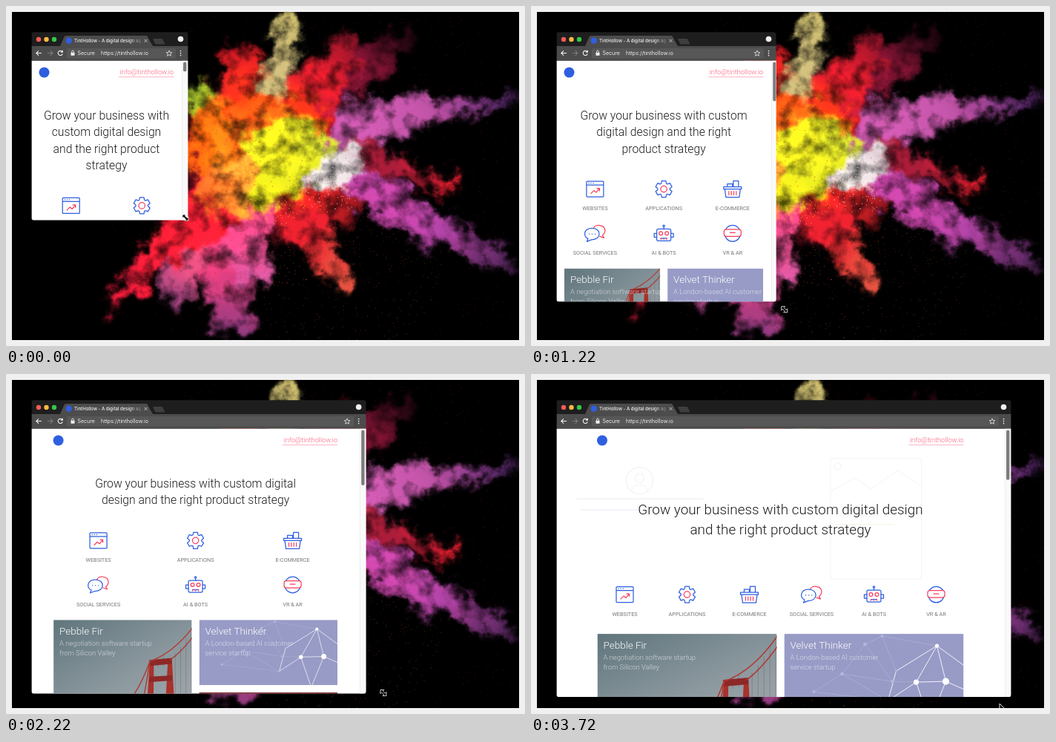
An HTML page that plays this animation: 700x458 px, repeating every 3.82 s.

```html
<!DOCTYPE html>
<html lang="en">
<head>
<meta charset="utf-8">
<title>Responsive page</title>
<style>
html, body { margin: 0; width: 100%; height: 100%; overflow: hidden; background: #f0f0f0; }
svg { position: absolute; left: 0; top: 0; width: 100%; height: 100%; display: block; }
#back { will-change: transform; }
text { font-family: Roboto, sans-serif; white-space: pre; }
.light { font-weight: 300; }
.ui { font-family: Inter, sans-serif; }
</style>
</head>
<body>
<svg id="back" viewBox="0 0 700 458">
  <defs>
    <filter id="smoke" filterUnits="userSpaceOnUse" x="0" y="0" width="700" height="458" color-interpolation-filters="sRGB">
      <feTurbulence type="fractalNoise" baseFrequency=".04" numOctaves="5" seed="7" result="n"/>
      <feColorMatrix in="n" values="0 0 2.4 0 -.4  0 0 2.4 0 -.4  0 0 2.4 0 -.4  0 0 0 0 1" result="tone"/>
      <feGaussianBlur in="SourceGraphic" stdDeviation="4" result="soft"/>
      <feDisplacementMap in="soft" in2="n" scale="44" xChannelSelector="R" yChannelSelector="G" result="torn"/>
      <feComposite in="torn" in2="tone" operator="arithmetic" k1=".85" k2=".36"/>
    </filter>
    <radialGradient id="glow">
      <stop stop-color="#e42020"/><stop offset=".6" stop-color="#c01a2c"/><stop offset="1" stop-color="#7a1028" stop-opacity="0"/>
    </radialGradient>
    <clipPath id="desk"><rect x="8" y="8" width="684" height="442"/></clipPath>
  </defs>
  <rect x="8" y="8" width="684" height="442"/>
  <g id="cloud" clip-path="url(#desk)"></g>
</svg>
<svg id="front" viewBox="0 0 700 458">
  <defs>
    <linearGradient id="fade" gradientUnits="userSpaceOnUse" x1="166" y1="0" x2="186" y2="0">
      <stop stop-color="#f2f2f2"/><stop offset="1" stop-color="#f2f2f2" stop-opacity="0"/>
    </linearGradient>
    <linearGradient id="fog" x1="0" y1="0" x2=".5" y2="1">
      <stop stop-color="#60757d"/><stop offset=".5" stop-color="#8c999f"/><stop offset="1" stop-color="#a9b1b6"/>
    </linearGradient>
    <clipPath id="edge"><rect x="8" y="8" width="684" height="442"/></clipPath>
    <g id="icons"></g>
  </defs>
  <g id="scene"></g>
</svg>
<script>
const LOOP = 3820, BLUE = '#2f5fe0', RED = '#f8405f';
const el = id => document.getElementById(id);

let seed = 11;
const rnd = () => (seed = seed * 16807 % 2147483647) / 2147483647;

// ---------- Markup helpers ----------
const rect = (x, y, w, h, fill, more = '') =>
  `<rect x="${x}" y="${y}" width="${w}" height="${h}" fill="${fill}" ${more}/>`;
const dot = (x, y, r, fill, more = '') => `<circle cx="${x}" cy="${y}" r="${r}" fill="${fill}" ${more}/>`;
const line = (d, color, w = 1, more = '') =>
  `<path d="${d}" fill="none" stroke="${color}" stroke-width="${w}" ${more}/>`;
const text = (s, x, y, size, fill, more = '') =>
  `<text x="${x}" y="${y}" font-size="${size}" fill="${fill}" ${more}>${s}</text>`;
const move = (x, y, inner, s = 1) => `<g transform="translate(${x} ${y}) scale(${s})">${inner}</g>`;

// ---------- Powder burst ----------
// Base x y, tip x y, half width at base and tip, two colours.
const outerPlumes = [
  [430, 115, 550, 36, 32, 16, '#7a1230', '#18040c'],
  [390, 155, 470, 42, 40, 20, '#e01c28', '#7a1024'],
  [440, 168, 695, 122, 28, 5, '#b04890', '#44205c'],
  [450, 168, 575, 132, 30, 24, '#b04c96', '#9c4488'],
  [470, 200, 606, 244, 18, 8, '#8f1830', '#d81c2c'],
  [450, 225, 684, 350, 20, 14, '#a83a90', '#46204e'],
  [480, 240, 600, 312, 24, 24, '#b03c94', '#90388a'],
  [375, 260, 464, 378, 34, 14, '#c81c28', '#c04a38'],
  [400, 245, 475, 280, 30, 16, '#d02020', '#701018'],
  [270, 275, 222, 402, 34, 22, '#e04a70', '#84386c'],
  [300, 250, 306, 444, 42, 28, '#e0386c', '#74306a'],
  [315, 265, 338, 375, 36, 26, '#dc4078', '#b84c8c'],
  [300, 235, 132, 418, 46, 2, '#e81c30', '#d81838'],
  [400, 140, 440, 140, 44, 30, '#d81c24', '#a8182c']
];
const innerPlumes = [
  [335, 160, 304, 54, 44, 24, '#ea3418', '#b01020'],
  [390, 160, 385, 92, 40, 24, '#e83810', '#c01828'],
  [360, 120, 385, 8, 19, 13, '#b0a068', '#a89c58'],
  [290, 160, 248, 112, 26, 18, '#c0a818', '#78a028'],
  [355, 195, 248, 185, 72, 56, '#ff9a18', '#f4580c'],
  [355, 195, 322, 122, 48, 36, '#ff7a18', '#f04010'],
  [340, 230, 262, 262, 42, 26, '#ffa030', '#f05020'],
  [420, 222, 482, 205, 32, 20, '#d4cccc', '#b4a6ac'],
  [380, 195, 346, 276, 44, 18, '#c2c41c', '#dcd418'],
  [360, 188, 440, 186, 36, 16, '#d4d01c', '#b8c22c']
];

function plume([x0, y0, x1, y1, w0, w1, c0, c1], i) {
  const len = Math.hypot(x1 - x0, y1 - y0), turn = Math.atan2(y1 - y0, x1 - x0) * 180 / Math.PI;
  const m = (w0 + w1) / 2;
  const d = `M${-w0} 0C${-w0} ${-w0 * 1.2} ${w0 * .6} ${-w0 * 1.2} ${len * .5} ${-m}` +
    `S${len} ${-w1 * 1.4} ${len} 0S${len * .7} ${m} ${len * .5} ${m}` +
    `S${-w0} ${w0 * 1.2} ${-w0} 0Z`;
  return `<linearGradient id="p${i}"><stop stop-color="${c0}"/><stop offset=".5" stop-color="${c0}"/>` +
    `<stop offset="1" stop-color="${c1}"/></linearGradient>` +
    `<path transform="translate(${x0} ${y0}) rotate(${turn})" fill="url(#p${i})" d="${d}"/>`;
}

function specks(n, color, place) {
  let d = '';
  for (let i = 0; i < n; i++) {
    const [x, y] = place();
    d += `M${x.toFixed(1)} ${y.toFixed(1)}h.9`;
  }
  return line(d, color, .9);
}
const ring = (cx, cy, r) => () => {
  const a = rnd() * 6.283, k = r * Math.sqrt(rnd());
  return [cx + k * Math.cos(a), cy + k * Math.sin(a)];
};

el('cloud').innerHTML =
  specks(1500, '#4a0c1a', ring(440, 250, 300)) + specks(500, '#5a3414', ring(440, 330, 150)) +
  '<g filter="url(#smoke)"><ellipse cx="360" cy="200" rx="150" ry="125" fill="url(#glow)"/>' +
  [...outerPlumes, ...innerPlumes].map(plume).join('') + '</g>' +
  specks(400, '#c03a30', ring(350, 230, 150)) + specks(90, '#e8dcd8', ring(440, 248, 36)) +
  specks(110, '#e4d820', ring(360, 255, 45));

// ---------- Service icons, centred on 0 0 ----------
function gearPath() {
  let d = '';
  for (let i = 0; i < 6; i++) {
    [[-.42, 8.3], [-.25, 11.4], [.25, 11.4], [.42, 8.3]].forEach(([o, r]) => {
      const a = i * Math.PI / 3 + Math.PI / 6 + o;
      d += (d ? 'L' : 'M') + (r * Math.cos(a)).toFixed(2) + ' ' + (r * Math.sin(a)).toFixed(2);
    });
  }
  return d + 'Z';
}
const ink = (d, color = BLUE) => line(d, color, 1.25, 'stroke-linejoin="round" stroke-linecap="round"');
const hoop = (x, y, r, color) => dot(x, y, r, 'none', `stroke="${color}" stroke-width="1.25"`);
const box = (x, y, w, h, r, color, fill = 'none') =>
  rect(x, y, w, h, fill, `rx="${r}" stroke="${color}" stroke-width="1.25"`);
const icons = [
  box(-11.5, -10.5, 23, 21, 1, BLUE) + ink('M-11-5.5H11M-8.5-8h.3M-5.5-8h.3M-2.5-8h.3') +
    ink('M-5.5 6L-1.5 2L1.5 4.5L6-1M2.5-1H6V2.5', RED),
  ink(gearPath()) + hoop(0, 0, 4.2, RED),
  ink('M-12-3H12V0H-12ZM-10.5 0L-9 11H9L10.5 0M-7-3V-7H0V-3M1-3V-11H8V-3') + ink('M-5 3V8M-1.7 3V8M1.7 3V8M5 3V8', RED),
  ink('M-2-7C0-13 13-12 13.5-4C13.5-1 12 1 10 2.5L12 6L6.5 4', RED) +
    ink('M-4-7C-16-7-16 5-9.5 7L-11 11L-5 8.5C9 9 9-7-4-7Z') + ink('M-8 .8h.3M-4 .8h.3M0 .8h.3'),
  box(-9.5, -6, 19, 16, 2, BLUE) + ink('M0-6V-9M-9.5 0H-13V5H-9.5M9.5 0H13V5H9.5M-4 6.5H4') + hoop(0, -10, 1.2, BLUE) +
    hoop(-4, 0, 2.4, RED) + hoop(4, 0, 2.4, RED) + ink('M-4 6.5V8M0 6.5V8M4 6.5V8', RED),
  hoop(0, 0, 10.8, BLUE) + box(-11.5, -5.5, 23, 9.5, 3, RED, '#fff') + ink('M-3.5-1H3.5', RED)
];
el('icons').innerHTML = icons.map((s, i) => `<g id="i${i}">${s}</g>`).join('');
const labels = ['WEBSITES', 'APPLICATIONS', 'E-COMMERCE', 'SOCIAL SERVICES', 'AI &amp; BOTS', 'VR &amp; AR'];

// ---------- Motion ----------
// Time, window right and bottom, page right, cursor x and y.
const keys = [
  [0, 245, 288.5, 245, 242, 285],
  [180, 245, 288.5, 245, 243, 287],
  [820, 288, 356, 292, 300, 375],
  [1520, 369, 420, 369, 380, 423],
  [1920, 435, 430, 435, 458, 428],
  [2620, 551, 431, 551, 572, 431],
  [3020, 612, 434.5, 612, 630, 433],
  [3380, 647, 435, 647, 644, 434],
  [3480, 647, 435, 647, 644, 434],
  [3720, 647, 435, 647, 632, 444],
  [3820, 647, 435, 647, 632, 444]
];

function slope(i, c) {
  const a = keys[i - 1], b = keys[i], d = keys[i + 1];
  if (!a || !d) return 0;
  const l = (b[c] - a[c]) / (b[0] - a[0]), r = (d[c] - b[c]) / (d[0] - b[0]);
  return l * r <= 0 ? 0 : 2 * l * r / (l + r);
}

function at(t, c) {
  let i = 0;
  while (i < keys.length - 2 && t >= keys[i + 1][0]) i++;
  const a = keys[i], b = keys[i + 1], h = b[0] - a[0], u = (t - a[0]) / h, v = 1 - u;
  return a[c] * v * v * (1 + 2 * u) + b[c] * u * u * (3 - 2 * u) +
    h * u * v * (slope(i, c) * v - slope(i + 1, c) * u);
}

// ---------- Browser window ----------
const LEFT = 34.4;

function chrome(R) {
  const grey = '#4c4c4c', pale = '#f0f0f0';
  return rect(LEFT, 35, R - LEFT + 1, 19.5, '#1e1e1e') +
    ['#fc5b57', '#fdbc40', '#34c84a'].map((c, i) => dot(44 + i * 10.5, 45, 3.2, c)).join('') +
    `<path d="M73 54L78.5 41.5Q79 40 81 40H189Q190.5 40 191 41.5L198 54Z" fill="${grey}"/>` +
    '<path d="M198 44H210Q211 44 211.5 45L214.5 51.5H203Q201 51.5 200.5 50Z" fill="#3e3e3e"/>' +
    dot(84.8, 46.7, 4.1, BLUE) +
    text('TintHollow - A digital design ag', 92, 49.2, 6.05, 'url(#fade)', 'class="ui" font-weight="500"') +
    line('M186.5 44.8l4 4m0-4l-4 4', '#c8c8c8', .9) +
    dot(R - 9.5, 44.5, 3.8, pale) +
    rect(LEFT, 54, R - LEFT + 1, 19.5, grey) + rect(82, 57, R - 98, 13.5, '#575757', 'rx="2"') +
    line('M48 63.5H41M44 60.3L40.8 63.5L44 66.7', pale, 1.1) +
    line('M56 63.5H62.5M59.7 60.3L62.9 63.5L59.7 66.7', '#7c7c7c', 1.1) +
    line('M75.8 61.5A3.1 3.1 0 1 0 76.3 64.5M76.3 59.8V62.3H73.8', pale, 1.1) +
    rect(87.5, 62.7, 5, 4, pale, 'rx=".5"') + line('M88.6 63V61.5A1.4 1.4 0 0 1 91.4 61.5V63', pale, .9) +
    text('Secure', 96.5, 66.3, 7, pale, 'class="ui"') +
    text('https://tinthollow.io', 128, 66.3, 7.1, pale, 'class="ui"') +
    move(R - 25, 63.7, line('M0-3.8L1.1-1.2L3.8-1L1.7.8L2.4 3.5L0 2L-2.4 3.5L-1.7.8L-3.8-1L-1.1-1.2Z', pale, .8)) +
    [-3, 0, 3].map(d => dot(R - 9.5, 63.6 + d, .85, pale)).join('');
}

// ---------- Page ----------
const headings = [
  ['Grow your business with', 'custom digital design', 'and the right product', 'strategy'],
  ['Grow your business with custom', 'digital design and the right', 'product strategy'],
  ['Grow your business with custom digital', 'design and the right product strategy'],
  ['Grow your business with custom digital design', 'and the right product strategy']
];

// Picks sizes for the width available.
function layout(pageRight) {
  const w = pageRight - 44, center = 35 + w / 2;
  if (w >= 514) return { center, cw: 494, cols: 6, size: 18.9, lead: 26.8, top: 188.8, iconGap: 81.5, labelGap: 29,
    cardGap: 24, lines: headings[3], doc: 1945, wide: true };
  const tablet = w >= 403, cw = tablet ? 383 : w - 20;
  const pick = tablet ? 2 : cw < 225 ? 0 : cw < 271 ? 1 : cw < 330 ? 2 : 3;
  return { center, cw, cols: cw < 265 ? 2 : 3, size: 15.75, lead: 22.3, top: 153, iconGap: 49, labelGap: 28.7,
    cardGap: 18.5, lines: headings[pick], doc: tablet ? 1709 : cw < 265 ? 3600 : 2000, phone: !tablet };
}

function cardText(title, lines, x, y) {
  return text(title, x + 8, y + 19.8, 13.5, '#fff', 'class="light"') +
    lines.map((s, i) => text(s, x + 8, y + 34.5 + i * 13, 9.4, '#fff', 'class="light" fill-opacity=".66"')).join('');
}

function bridge(w, L) {
  const s = L.phone ? w / 181 : L.wide ? 1 : .9;
  const top = L.phone ? 28 : L.wide ? 62 : 54;
  const tower =
    '<path d="M-18 90L-12 0H-6L-7 90ZM10 90L15-1H21L26 90Z" fill="#a8322c"/>' +
    '<path d="M-13 0L21-3V6L-13 9ZM-12 25L21 23V31L-13 33ZM-14 52L23 50V57L-14 59Z" fill="#8e2826"/>' +
    line('M-12 2Q28-12 62-62M18 0Q40-14 72-62M-12 2Q-22 30-36 52M-12 2Q-18 40-24 70', '#b03a34', 1.6) +
    line('M0-4V12M8-8V10M26-10V80M34-20V80M42-32V80M50-44V80M58-56V80', '#7a3a3a', .5, 'opacity=".6"');
  return rect(0, 0, w, 220, 'url(#fog)') + move(w * .755, top, tower, s);
}

const nodes = [[178, 65, 3.6], [218, 64, 4.6], [206, 16, 2.6], [140, 90, 2], [151, 50, 1.6],
  [78, 54, 2.4], [109, 14, 2.4], [132, 3, 2], [146, 64, 2.4], [40, 78, 2], [250, 48, 2], [250, 78, 2], [196, 118, 2]];
const strong = ['0 2', '2 1', '0 1', '0 3', '2 10', '1 11', '0 12', '1 12', '2 4', '4 3'];
const faint = ['5 6', '6 7', '5 8', '6 8', '7 2', '9 5', '8 0', '9 3', '7 4', '5 3'];
const edges = list => list.map(e => {
  const [a, b] = e.split(' ').map(i => nodes[i]);
  return `M${a[0]} ${a[1]}L${b[0]} ${b[1]}`;
}).join('');

function network(x, y, w, L) {
  const h = L.phone ? 123 : w * .471, s = w / 242;
  const art = line(edges(faint), '#b9bbdc', .8, 'opacity=".6"') + line(edges(strong), '#f2f2fa', 1) +
    nodes.map(([a, b, r], i) => dot(a, b, r, i < 3 ? '#fff' : '#b4b6da')).join('');
  return `<svg x="${x}" y="${y}" width="${w}" height="${h}">` + rect(0, 0, w, h, '#989bc6') +
    move(0, L.phone ? h - w * .471 : 0, art, s) + '</svg>' +
    rect(x, y + h + 10, w, 100, '#6a1418');
}

function hero(L, t) {
  const x = L.center, c = '#f3f3f6';
  const late = t > 3150 ? rect(x - 275, 167.5, 171, 1.5, '#f0f0f6') + rect(x - 270, 182.5, 84, 1.5, '#f0f0f8') +
    rect(x + 74, 190.5, 62, 1.2, c) + rect(x + 74, 202, 80, 1.2, '#f7f4ea') : '';
  return hoop(x - 190, 143.5, 18, c) + line(`M${x - 201} 157q2-8 11-8t11 8`, c) + hoop(x - 190, 140, 6, c) +
    rect(x + 67.5, 114, 122.5, 162, 'none', `stroke="${c}"`) + hoop(x + 77, 124, 4.5, c) +
    line(`M${x + 68} 158L${x + 100} 140L${x + 122} 155L${x + 158} 130L${x + 189} 150`, c) + late;
}

function page(R, B, pr, t) {
  const L = layout(pr), left = L.center - L.cw / 2, right = L.center + L.cw / 2;
  const mid = 'text-anchor="middle"', n = L.lines.length;
  let out = rect(LEFT, 73.5, R - LEFT + 1, B - 73, '#fff') + (L.wide ? hero(L, t) : '') +
    dot(left + 6.5, 89.5, 7, BLUE) +
    text('info@tinthollow.io', right, 91.7, 9.25, '#fb5f7d', 'class="light" text-anchor="end"') +
    rect(right - 74, 95, 74, .8, '#f9a5b5');
  L.lines.forEach((s, i) => out += text(s, L.center, L.top + i * L.lead, L.size, '#1c1c1c', `class="light" ${mid}`));

  const pitch = (L.cw + 10) / L.cols, iconY = L.top + (n - 1) * L.lead + L.iconGap;
  labels.forEach((s, i) => {
    const x = left + (pitch - 10) / 2 + pitch * (i % L.cols), y = iconY + 59.7 * Math.floor(i / L.cols);
    out += `<use href="#i${i}" x="${x}" y="${y}"/>` + text(s, x, y + L.labelGap, 7.3, '#777', mid);
  });

  if (L.cols > 2) {
    const y = iconY + 59.7 * (6 / L.cols - 1) + L.labelGap + L.cardGap, w = (L.cw - 10) / 2, x2 = left + w + 10;
    const roomy = L.phone && w > 168;
    out += `<svg x="${left}" y="${y}" width="${w}" height="220">${bridge(w, L)}</svg>` + network(x2, y, w, L) +
      cardText('Pebble Fir', roomy ? ['A negotiation software startup from', 'Silicon Valley']
        : ['A negotiation software startup', 'from Silicon Valley'], left, y) +
      cardText('Velvet Thinker', roomy ? ['A London-based AI customer service', 'startup']
        : ['A London-based AI customer', 'service startup'], x2, y);
  }
  const view = B - 73.5;
  return out + rect(pr - 8, 73.5, 8, view, '#fafafa') + rect(pr - 8, 73.5, .6, view, '#e6e6e6') +
    rect(pr - 6, 75.5, 4.4, view * view / L.doc, '#7d7d7d', 'rx="2.2"');
}

function cursor(x, y, t) {
  if (t >= 3480) return move(x, y,
    '<path d="M0 0V9.5L2.3 7.5L4 11L5.6 10.2L4 6.9H7Z" fill="#000" stroke="#fff" stroke-width=".9"/>');
  return move(x, y, '<path d="M-4-4H1L-.6-2.4L2.4.6L4-1V4H-1L.6 2.4L-2.4-.6L-4 1Z" fill="#000" stroke="#fff" stroke-width=".8"/>');
}

function draw(t) {
  const [R, B, pr, cx, cy] = [1, 2, 3, 4, 5].map(c => at(t, c));
  el('scene').innerHTML =
    `<clipPath id="win">${rect(LEFT, 35.2, R - LEFT + .4, B - 35.2, '#000', 'rx="3"')}</clipPath>` +
    `<g clip-path="url(#win)">${page(R, B, pr, t)}${chrome(R)}</g>` +
    `<g clip-path="url(#edge)">${cursor(cx, cy, t)}</g>`;
}

// The picture holds for 120 ms, then advances every 100 ms.
let shown = -1;
const start = performance.now();
function tick() {
  const t = (performance.now() - start) % LOOP;
  const step = t < 120 ? 0 : 120 + Math.floor((t - 120) / 100) * 100;
  if (step !== shown) draw(shown = step);
  requestAnimationFrame(tick);
}
tick();
</script>
</body>
</html>
```
